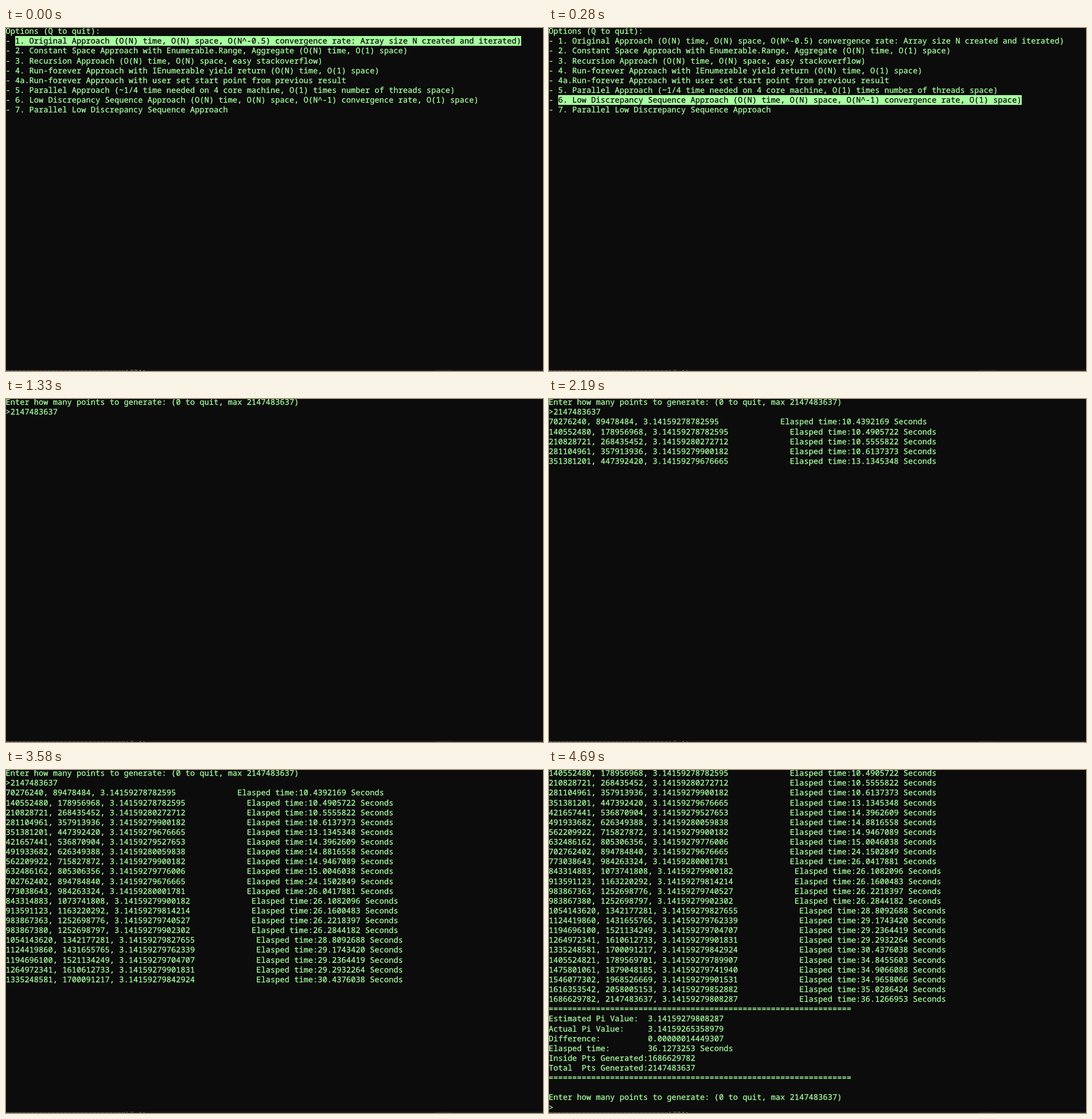
Write an HTML page with a canvas that moves like this. It is 936 by 598 pixels and loops after 4710 ms.

```html
<!DOCTYPE html>
<html lang="en">
<head>
<meta charset="utf-8">
<title>Pi estimation console</title>
<style>
  html, body { margin: 0; width: 100%; height: 100%; overflow: hidden; background: #0c0c0c; }
  canvas { display: block; }
</style>
</head>
<body>
<canvas id="screen" width="936" height="598"></canvas>
<script>
const LOOP = 4710, MENU_END = 520, DONE = 4370;
const CELL = 8.244, ROW = 17.13, LEFT = -0.6, VISIBLE_ROWS = 35;
const BACK = '#0c0c0c', INK = '#a6ff9f';
const ctx = document.getElementById('screen').getContext('2d');

const menu = [
  'Options (Q to quit):',
  '- 1. Original Approach (O(N) time, O(N) space, O(N^-0.5) convergence rate: Array size N created and iterated)',
  '- 2. Constant Space Approach with Enumerable.Range, Aggregate (O(N) time, O(1) space)',
  '- 3. Recursion Approach (O(N) time, O(N) space, easy stackoverflow)',
  '- 4. Run-forever Approach with IEnumerable yield return (O(N) time, O(1) space)',
  '- 4a.Run-forever Approach with user set start point from previous result',
  '- 5. Parallel Approach (~1/4 time needed on 4 core machine, O(1) times number of threads space)',
  '- 6. Low Discrepancy Sequence Approach (O(N) time, O(N) space, O(N^-1) convergence rate, O(1) space)',
  '- 7. Parallel Low Discrepancy Sequence Approach',
];

const POINTS = 2147483637, INSIDE = 1686629782, THREADS = 24;
const prompt = `Enter how many points to generate: (0 to quit, max ${POINTS})`;

// Reports arrive in bursts as threads finish
const bursts = [
  { at: 1760, seconds: 10.43, count: 4 },
  { at: 2190, seconds: 13.13, count: 1 },
  { at: 2350, seconds: 14.39, count: 1 },
  { at: 2410, seconds: 14.88, count: 3 },
  { at: 2680, seconds: 24.15, count: 1 },
  { at: 2920, seconds: 26.04, count: 5 },
  { at: 3370, seconds: 28.8, count: 1 },
  { at: 3410, seconds: 29.17, count: 3 },
  { at: 3580, seconds: 30.43, count: 1 },
  { at: 4120, seconds: 34.84, count: 4 },
  { at: DONE, seconds: 36.12, count: 1 },
];

const noise = n => Math.abs(Math.sin(n * 12.9898) * 43758.5453) % 1;

function makeReport(index, at, seconds) {
  // The leftover points form one tiny batch after the 14th full one
  const batch = Math.floor(POINTS / THREADS);
  const total = index < 14 ? batch * (index + 1) : batch * index + POINTS % THREADS;
  const inside = Math.round(total * INSIDE / POINTS);
  const pi = (4 * inside / total).toFixed(14);
  const text = `${inside}, ${total}, ${pi}${' '.repeat(13)}Elasped time:${seconds.toFixed(7)} Seconds`;
  return { at, seconds, text };
}

const reports = [];
for (const { at, seconds, count } of bursts) {
  for (let i = 0; i < count; i++) {
    const index = reports.length;
    reports.push(makeReport(index, at + i * 30, seconds + i * 0.06 + noise(index + 1) * 0.01));
  }
}

const rule = '='.repeat(64);
const estimate = 4 * INSIDE / POINTS;
const stat = (label, value) => label.padEnd(21) + value;
const summary = [
  rule,
  stat('Estimated Pi Value:', estimate.toFixed(14)),
  stat('Actual Pi Value:', Math.PI.toFixed(14)),
  stat('Difference:', (estimate - Math.PI).toFixed(14)),
  stat('Elasped time:', (reports.at(-1).seconds + 0.00063).toFixed(7) + ' Seconds'),
  stat('Inside Pts Generated:', INSIDE),
  stat('Total  Pts Generated:', POINTS),
  rule, '', prompt, '>',
];

// How many evenly spaced events have happened by time t
const ticks = (t, start, gap, max) =>
  Math.max(0, Math.min(max, Math.floor((t - start) / gap) + 1));

function stateAt(t) {
  const bright = t < 250 || t >= 4690;
  if (t < MENU_END) {
    return { lines: menu, selected: 1 + ticks(t, 70, 42, 6) + (t >= 380 ? 1 : 0), bright };
  }
  const typed = ticks(t, 700, 62, 6) + ticks(t, 1210, 40, 4);
  const lines = [
    prompt,
    '>' + String(POINTS).slice(0, typed),
    ...reports.filter(report => report.at <= t).map(report => report.text),
  ];
  if (t >= DONE) lines.push(...summary);
  return { lines: lines.slice(-VISIBLE_ROWS), selected: -1, bright };
}

function rect(color, x, y, w, h) {
  ctx.fillStyle = color;
  ctx.fillRect(x, y, w, h);
}

function drawLine(text, row, selected) {
  const top = Math.round(ROW * row - 3.2);
  const baseline = Math.round(ROW * row + 10.15);
  if (selected) rect(INK, 16, top, Math.round(LEFT + text.length * CELL) - 16, 17);
  [...text].forEach((char, col) => {
    if (char === ' ') return;
    const x = LEFT + col * CELL;
    ctx.fillStyle = ctx.strokeStyle = selected && col > 1 ? BACK : INK;
    ctx.fillText(char, x, baseline);
    ctx.strokeText(char, x, baseline);
  });
}

// Sliver of the window behind, along the bottom edge
function drawEdge(bright) {
  rect('#1e1e1e', 0, 596, 936, 2);
  rect('#2b2b2b', 748, 596, 31, 2);
  rect('#232323', 779, 596, 157, 2);
  for (let i = 0; i < 29; i++) rect('#5c5c58', i * 7.2, 597, 6, 1);
  const color = bright ? '#8d8560' : '#66645c';
  rect(color, 210, 596, 1.5, 2);
  rect(color, 217, 596, 5, 1);
  if (bright) rect(color, 224, 596, 5, 1);
  rect(color, 233, 596, 2, 2);
  rect(color, 239, 597, 3, 1);
}

function draw({ lines, selected, bright }) {
  rect(BACK, 0, 0, 936, 598);
  ctx.font = '13.6px "Noto Sans Mono", monospace';
  ctx.textRendering = 'geometricPrecision';
  ctx.lineWidth = 0.3;
  ctx.lineJoin = 'round';
  lines.forEach((text, row) => drawLine(text, row, row === selected));
  drawEdge(bright);
}

let shown = '';
function tick() {
  const state = stateAt(performance.now() % LOOP);
  const key = JSON.stringify(state);
  if (key !== shown) draw(state);
  shown = key;
  requestAnimationFrame(tick);
}
tick();
</script>
</body>
</html>
```
